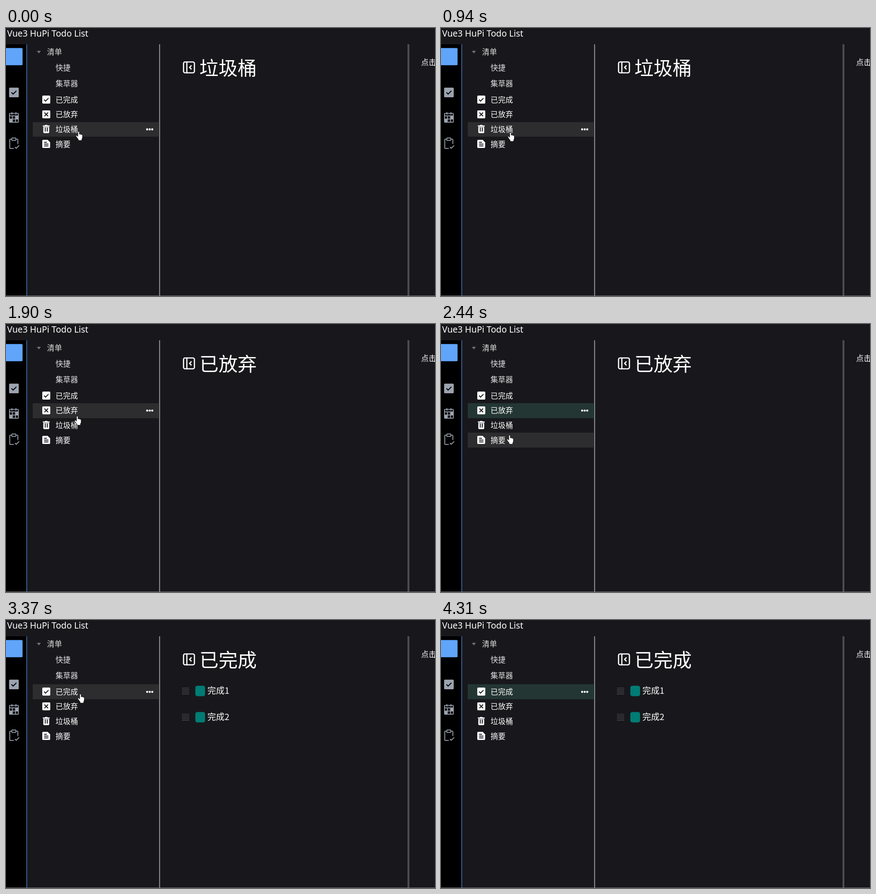
Animation of 946 by 592 pixels, one loop 4.74 s. Source, as an HTML page:

```html
<!DOCTYPE html>
<html lang="zh-CN">
<head>
<meta charset="utf-8">
<title>Todo List</title>
<style>
html, body { margin: 0; width: 100%; height: 100%; overflow: hidden; background: #18181c; }
svg { display: block; width: 100%; height: 100%; }
text { font-family: "Noto Sans CJK SC", "Noto Sans CJK", "Noto Sans CJK JP", sans-serif; font-size: 16.5px; fill: #fff; }
.latin { font-family: "Noto Sans", "Open Sans", sans-serif; font-size: 19.3px; }
.big { font-size: 42.2px; }
.task { font-size: 19px; }
.dim { fill: #dfdfe1; }
.line { fill: none; stroke: #9ca3af; stroke-width: 2; }
.ink { fill: none; stroke: #18181c; stroke-width: 2; }
</style>
</head>
<body>
<svg viewBox="0 0 946 592">
  <rect width="946" height="592" fill="#18181c"/>
  <rect y="36" width="45" height="555" fill="#000"/>
  <rect x="45" y="36" width="1.3" height="555" fill="#4c87d6"/>
  <rect x="337.8" y="36" width="1.8" height="555" fill="#a3a3a5"/>
  <path d="M886.3 36V591M888.5 36V591" stroke="#858587"/>
  <rect y="591" width="946" height="1" fill="#77757a"/>

  <text class="latin" x="2.5" y="18.5">Vue3 HuPi Todo List</text>
  <path d="M0 44.300H34.500a2 2 0 0 1 2 2V80.300a2 2 0 0 1-2 2H0z" fill="#60a5fa"/>

  <!-- side bar, icons on a 32 unit grid -->
  <g class="line">
    <g transform="translate(3.300 128.300) scale(.885)">
      <rect x="5" y="5" width="22" height="22" rx="1" fill="#9ca3af"/>
      <path d="M9.800 15.800L14 20l8.200-8.200" stroke="#000" stroke-width="2.300"/>
    </g>
    <g transform="translate(3.300 184.300) scale(.885)">
      <rect x="5" y="5" width="22" height="22" rx="1"/>
      <path d="M11 2V8M21 2V8M5 11H27M5 19H27M12 11V27M20 11V27"/>
      <path d="M5 19h7v8H5zM20 11h7v8H20z" fill="#9ca3af" stroke="none"/>
    </g>
    <g transform="translate(3 240.300) scale(.89)">
      <path d="M16 29H7a1 1 0 0 1-1-1V7a1 1 0 0 1 1-1H10M22 6h3a1 1 0 0 1 1 1V18M18.700 25.300L22 28.600 29.300 21.300"/>
      <rect x="11" y="3" width="10" height="6" rx="1"/>
    </g>
  </g>

  <!-- list menu -->
  <path d="M68 50.500H77L72.500 56z" fill="#77777b"/>
  <text class="dim" x="90.500" y="58.500">清单</text>
  <text class="dim" x="109.300" y="94">快捷</text>
  <text class="dim" x="109.300" y="128.500">集草器</text>
  <rect id="selRow" x="59" width="279" fill="#233633"/>
  <rect id="hoverRow" x="59" width="279" fill="#2d2d30"/>
  <g id="menu"></g>
  <g id="dots" fill="#fff">
    <circle cx="311.300" r="2.300"/><circle cx="316.900" r="2.300"/><circle cx="322.500" r="2.300"/>
  </g>

  <!-- content -->
  <g fill="none" stroke="#fff" stroke-width="2.600">
    <rect x="391.500" y="75" width="24" height="24" rx="3.500"/>
    <path d="M398.800 75V99M409 82.700l-4 4.300 4 4.300"/>
  </g>
  <text id="title" class="big" x="426.500" y="104"></text>
  <g id="tasks"></g>
  <text x="915.500" y="82">点击</text>

  <path id="cursor" fill="#fff" stroke="#000" stroke-width=".8"/>
</svg>
<script>
const LOOP = 4740, TICK = 134.7, EXIT = 27, GONE = 32;
const ROW0 = 142.4, PITCH = 32.6;
const $ = id => document.getElementById(id);

const box = '<rect x="-8.800" y="-8.800" width="17.600" height="17.600" rx="2" fill="#fff"/>';
const items = [
  ['已完成', box + '<path class="ink" d="M-5 0l3.400 3.400 6.600-6.600"/>'],
  ['已放弃', box + '<path class="ink" d="M-4-4L4 4M4-4L-4 4"/>'],
  ['垃圾桶', '<path fill="#fff" d="M-7.500-8H-3l1-1.300H2l1 1.300H7.500V-5.500H-7.500zM-6.500-4.700H6.500V7a2 2 0 0 1-2 2h-9a2 2 0 0 1-2-2z"/><path class="ink" d="M-2.200-3.500V5.500M2.200-3.500V5.500"/>'],
  ['摘要', '<path fill="#fff" d="M-6.800-8.800H3L8.500-3.500V7a2 2 0 0 1-2 2H-6.800a2 2 0 0 1-2-2V-6.800a2 2 0 0 1 2-2z"/><path class="ink" d="M-4.800-3.500H1.500M-4.800.5H4.800M-4.800 4.500H4.800"/>']
];

// turning points of the pointer: tick, x, y
const stops = [
  [0, 154, 228], [2, 142, 260], [4, 143, 243], [9, 150, 221], [11, 152, 193], [13, 152, 193],
  [18, 145, 245], [20, 147, 241], [21, 149, 191], [25, 158, 163], [26, 162, 220], [EXIT, 490, 412]
];
const clicks = [0, 4, 7, 12, 19, 25];

const hand = 'M4.600 2a1.600 1.600 0 0 1 3.200 0v5c.6-1.200 2.600-1 2.900.3c.8-.8 2-.3 2.200.7c1-.5 1.800.2 1.800 1.200v4.500c0 2-1.600 3-1.600 4.600v2.200h-7.400v-2l-5-7c-1-2 1-3 2.200-1.700l1.700 1.700z';
const arrow = 'M.5.5V15.500L4 12.200l2.200 4.600 2.200-1-2.100-4.500H11z';

const mix = (a, b, p) => Math.round(a + (b - a) * p);
const rowTop = i => Math.round(ROW0 + PITCH * i);
const rowMid = i => ROW0 + PITCH * (i + .5);
const rowAt = y => Math.floor((y - ROW0) / PITCH);

function pointer(tick) {
  if (tick >= EXIT) {
    const p = (tick - EXIT) / 4;
    return [mix(490, 869, 1 - (1 - Math.min(p, 1)) ** 4.7), mix(412, 570, p)];
  }
  const i = stops.findLastIndex(s => s[0] <= tick);
  const [t0, x0, y0] = stops[i], [t1, x1, y1] = stops[i + 1];
  const p = (tick - t0) / (t1 - t0);
  return [mix(x0, x1, p), mix(y0, y1, p)];
}

$('menu').innerHTML = items.map(([name, icon], i) =>
  `<g transform="translate(88.800 ${rowMid(i) - .6})">${icon}</g>` +
  `<text x="109.300" y="${rowMid(i) + 6}">${name}</text>`).join('');

$('tasks').innerHTML = [1, 2].map(n => {
  const grip = [0, 1, 2, 3, 4].map(k => `M0 ${k * 3.3}h16`).join('');
  return `<g transform="translate(388 ${92.300 + n * 58})">
    <path d="${grip}" stroke="#48484c" stroke-width="1.300"/>
    <rect x="29.500" y="-5" width="21.500" height="23" rx="4.500" fill="#007c74"/>
    <text class="task" x="56" y="13">完成${n}</text></g>`;
}).join('');

function placeRow(el, i) {
  el.style.display = i < 0 ? 'none' : '';
  if (i < 0) return;
  el.setAttribute('y', rowTop(i));
  el.setAttribute('height', rowTop(i + 1) - rowTop(i));
}

function draw(t) {
  const tick = Math.floor(t / TICK + .15);
  const [x, y] = pointer(tick);
  const sel = rowAt(pointer(clicks.findLast(c => c <= tick))[1]);
  const inMenu = tick < EXIT;
  placeRow($('selRow'), sel);
  placeRow($('hoverRow'), inMenu ? rowAt(y) : -1);
  $('dots').setAttribute('transform', `translate(0 ${rowMid(sel)})`);
  $('title').textContent = items[sel][0];
  $('tasks').style.display = sel === 0 ? '' : 'none';
  $('cursor').setAttribute('d', inMenu ? hand : arrow);
  $('cursor').setAttribute('transform', `translate(${x} ${y})`);
  $('cursor').style.display = tick < GONE ? '' : 'none';
}

const start = performance.now();
function frame() {
  draw((performance.now() - start) % LOOP);
  requestAnimationFrame(frame);
}
frame();
</script>
</body>
</html>
```
